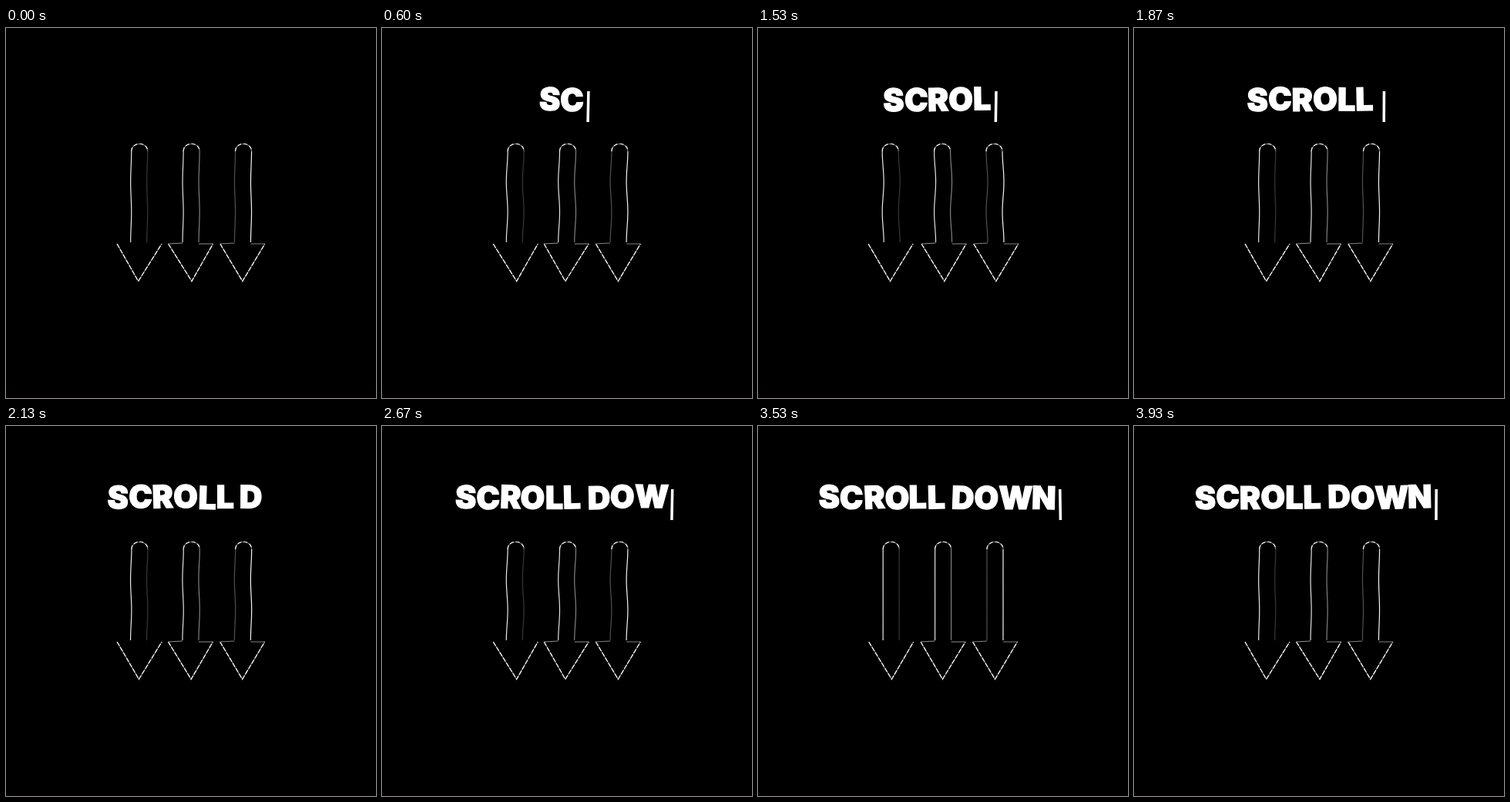
These frames come from a looping animation (480 px wide and 480 px high, 3.99 s). An HTML page with a canvas:

```html
<!DOCTYPE html>
<html lang="en">
<head>
<meta charset="utf-8">
<title>Scroll down</title>
<style>
  html, body { margin: 0; width: 100%; height: 100%; overflow: hidden; background: #000; }
  canvas { display: block; }
</style>
</head>
<body>
<canvas id="stage" width="480" height="480"></canvas>
<script>
const ctx = document.getElementById('stage').getContext('2d');
const LOOP = 3990, STEP = 1000 / 15;
const TEXT = 'SCROLL DOWN', CENTER = 232.5, BASELINE = 107;

// sway moves the tip alone, lean shifts the whole head.
const ARROWS = [
  { sway: -1.4, lean: .6, left: '#e8e8e8', right: '#383838' },
  { sway: 1.4, lean: -1, left: '#e0e0e0', right: '#808080', barbs: '#909090' },
  { sway: 0, lean: -1.3, left: '#505050', right: '#f4f4f4', barbs: '#808080' }
];

// Seeded random number from -1 to 1.
function jitter(a, b) {
  const s = Math.sin(a * 12.9898 + b * 78.233 + 4) * 43758.5453;
  return (s - Math.floor(s)) * 2 - 1;
}

function stroke(color, trace, dash = []) {
  ctx.strokeStyle = color;
  ctx.setLineDash(dash);
  ctx.beginPath();
  trace();
  ctx.stroke();
}

function sketch(trace, dash) {
  stroke('#777', trace);
  stroke('#fff', trace, dash);
}

function drawArrow({ sway, lean, left, right, barbs }, i, pose) {
  const wave = Math.cos(.16 * pose * pose - 1);
  const center = 172.7 + 67.4 * i;
  const l = center - 10.5, r = center + 10.5;
  const head = center + lean * wave;
  const tip = head + sway * Math.cos(pose * Math.PI / 3);

  const stem = (x, color) => stroke(color, () => {
    for (let v = 0; v <= 1.001; v += .05) {
      ctx.lineTo(x + wave * Math.cos(v * 3 * Math.PI), 160 + v * 118);
    }
  });
  stem(l, left);
  stem(r, right);

  sketch(() => {
    ctx.moveTo(l + wave, 160);
    ctx.bezierCurveTo(l + wave, 147, r + wave, 147, r + wave, 160);
  }, [5, 3]);
  sketch(() => {
    ctx.moveTo(head - 29, 280);
    ctx.lineTo(tip, 328.5);
    ctx.lineTo(head + 29, 280);
  }, [6, 2]);
  if (barbs) stroke(barbs, () => {
    ctx.moveTo(head - 29, 280);
    ctx.lineTo(l - wave, 279);
    ctx.moveTo(r - wave, 280);
    ctx.lineTo(head + 29, 280);
  });
}

function drawTitle(frame, pose) {
  const typed = TEXT.slice(0, Math.floor(frame / 4));
  ctx.font = '900 41px Inter, sans-serif';
  ctx.fillStyle = ctx.strokeStyle = '#fff';
  ctx.textAlign = 'center';
  ctx.setLineDash([]);
  const width = ctx.measureText(typed).width, start = CENTER - width / 2;
  [...typed].forEach((char, i) => {
    const x = start + ctx.measureText(typed.slice(0, i)).width + ctx.measureText(char).width / 2;
    ctx.save();
    ctx.translate(x + jitter(i, pose) * .6, BASELINE - 14 + jitter(i + 20, pose));
    ctx.rotate(jitter(i + 40, pose) * .045);
    ctx.fillText(char, 0, 14);
    ctx.strokeText(char, 0, 14);
    ctx.restore();
  });
  if (frame % 15 >= 8) {
    ctx.save();
    ctx.translate(start + width + 6, 102);
    ctx.rotate(jitter(60, pose) * .03);
    ctx.fillRect(-1.75, -20, 3.5, 40);
    ctx.restore();
  }
}

function draw(time) {
  const frame = Math.min(59, Math.floor(time % LOOP / STEP + .06));
  const pose = frame % 31 % 28 % 6;
  ctx.fillStyle = '#000';
  ctx.fillRect(0, 0, 480, 480);
  ctx.fillStyle = '#080002';
  ctx.fillRect(0, 477, 480, 3);
  ctx.lineWidth = 1.2;
  ARROWS.forEach((arrow, i) => drawArrow(arrow, i, pose));
  drawTitle(frame, pose);
}

const began = performance.now();
function tick() {
  draw(performance.now() - began);
  requestAnimationFrame(tick);
}
tick();
</script>
</body>
</html>
```
